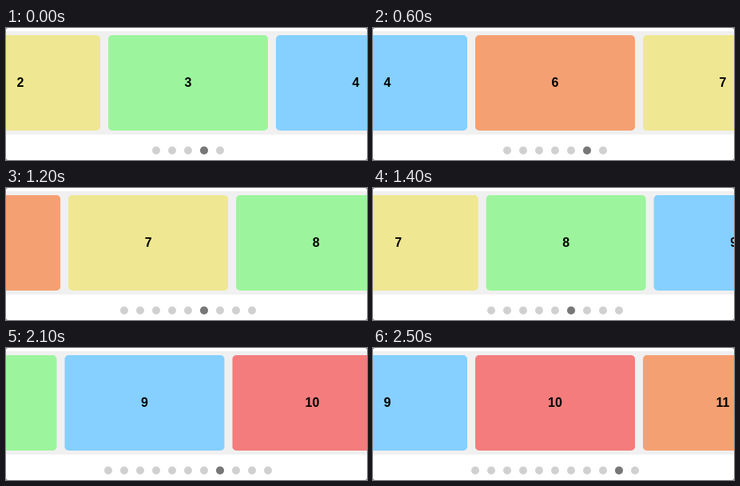
Animation of 452x166 px, one loop 2600 ms. Source, as an HTML page:

```html
<!DOCTYPE html>
<html lang="en">
<head>
<meta charset="utf-8">
<title>Carousel</title>
<style>
  html, body { margin: 0; width: 100%; height: 100%; overflow: hidden; background: #888; }
  .stage {
    position: relative; width: 452px; height: 166px;
    overflow: hidden; border-radius: 3px; background: #fff;
  }
  .view {
    position: absolute; left: 0; top: 4px; width: 452px; height: 130px;
    overflow: hidden; background: #f0f0f0;
  }
  .track {
    position: absolute; left: 128px; top: 5px; display: flex; gap: 10px;
    animation: slide 2600ms infinite cubic-bezier(.35, 0, .45, 1);
  }
  .card {
    flex: none; width: 200px; height: 120px; border-radius: 5px;
    font: bold 16px/120px "Liberation Sans", Arial, sans-serif;
    text-align: center; color: #000;
  }
  .dots {
    position: absolute; left: 118px; top: 144px; width: 220px; height: 20px;
    animation: grow 2600ms infinite step-end;
  }
  .dot {
    position: absolute; top: 5px; left: 5px; width: 10px; height: 10px;
    border-radius: 50%; background: #d0d0d0;
  }
  .active { background: #777; animation: pick 2600ms infinite step-end; }

  @keyframes slide {
    0% { transform: translateX(-630px); }
    21.81%, 35.15% { transform: translateX(-1050px); }
    57.54%, 69.62% { transform: translateX(-1470px); }
    92%, 100% { transform: translateX(-1890px); }
  }
  /* two more dots each time a page is loaded */
  @keyframes grow {
    0% { clip-path: inset(0 60px); }
    6.23% { clip-path: inset(0 40px); }
    41.58% { clip-path: inset(0 20px); }
    76.04%, 100% { clip-path: inset(0); }
  }
  @keyframes pick {
    0% { transform: translateX(120px); }
    6.23% { transform: translateX(100px); }
    21.81% { transform: translateX(140px); }
    41.58% { transform: translateX(120px); }
    57.54% { transform: translateX(160px); }
    76.04% { transform: translateX(140px); }
    92%, 100% { transform: translateX(180px); }
  }
</style>
</head>
<body>
<div class="stage">
  <div class="view"><div class="track"></div></div>
  <div class="dots"></div>
</div>
<script>
  const colors = ['#f47c7c', '#f5a072', '#efe791', '#9cf59c', '#85d0ff'];
  const labels = [0, 1, 2, 3, 4, 6, 7, 8, 9, 10, 11];
  const track = document.querySelector('.track');
  const dots = document.querySelector('.dots');

  function add(parent, className) {
    const el = document.createElement('div');
    el.className = className;
    return parent.appendChild(el);
  }

  labels.forEach((label, i) => {
    const card = add(track, 'card');
    card.textContent = label;
    card.style.background = colors[label % colors.length];
    add(dots, 'dot').style.left = 5 + 20 * i + 'px';
  });
  add(dots, 'dot active');
</script>
</body>
</html>
```
